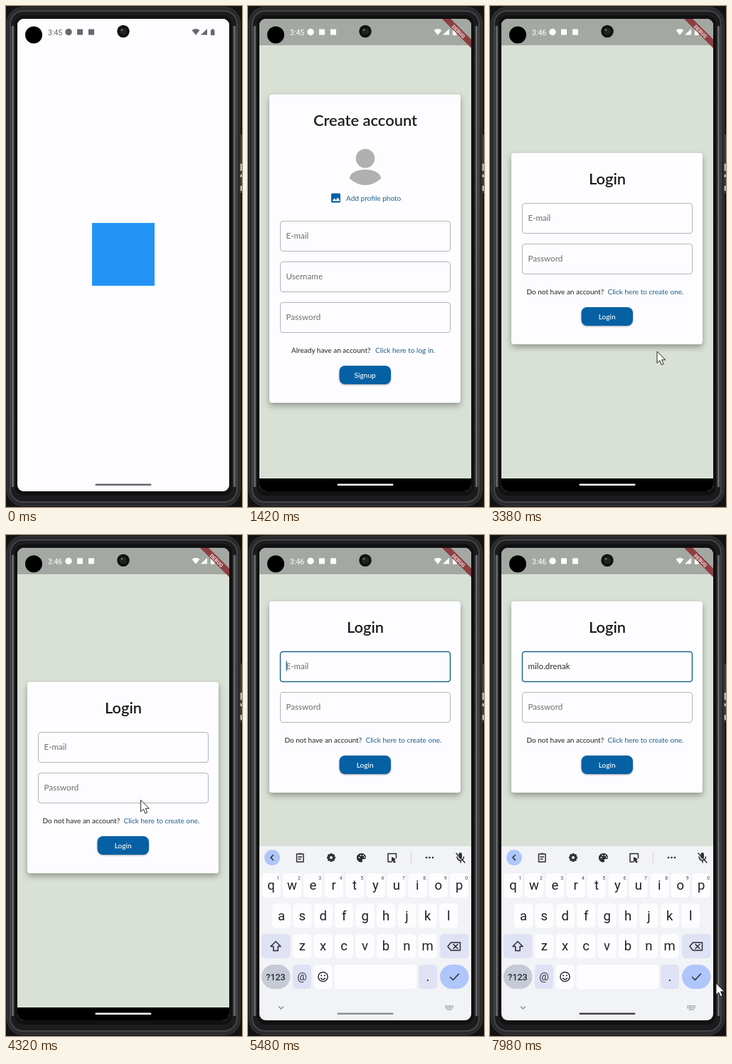
An HTML page that plays this animation: 332x702 px, repeating every 8 s.

```html
<!DOCTYPE html>
<html lang="en">
<head>
<meta charset="utf-8">
<style>
  html, body { margin: 0; width: 100%; height: 100%; overflow: hidden; background: #121213; }
  svg { display: block; width: 332px; height: 702px; font-family: Lato, sans-serif; }
  .card { fill: #fdfcff; filter: drop-shadow(0 4px 4px #0005); }
  .title { font-size: 21.9px; font-weight: 600; fill: #1b1c1e; }
  .box { fill: none; stroke: #b3b6b9; }
  .focus .box { stroke: #22688c; stroke-width: 1.5; }
  .label { font-size: 11.6px; fill: #6c6e70; }
  .typed { font-size: 11.6px; fill: #2c2d2f; }
  .small { font-size: 10px; fill: #1f2022; }
  .link { font-size: 10.05px; fill: #1f5f8c; }
  .button { fill: #0561a4; filter: drop-shadow(0 1px 1px #0005); }
  .caption { font-size: 10.1px; font-weight: 500; fill: #fff; }
  .key { font: 18.5px Roboto, sans-serif; fill: #1e1f22; }
  .digit { font: 7px Roboto, sans-serif; fill: #4b4c52; }
  .line { fill: none; stroke: #2c2d32; stroke-width: 1.5; stroke-linejoin: round; stroke-linecap: round; }
  .mid { text-anchor: middle; }
</style>
</head>
<body>
<svg viewBox="0 0 332 702">
  <defs>
    <clipPath id="screen"><rect x="16" y="18" width="298" height="662" rx="9"/></clipPath>
    <linearGradient id="metal">
      <stop offset="0" stop-color="#222224"/><stop offset=".5" stop-color="#747476"/><stop offset="1" stop-color="#222224"/>
    </linearGradient>
  </defs>

  <rect width="332" height="702" fill="#121213"/>
  <rect x="1.5" y="1.5" width="328" height="699" rx="22" fill="#2a2a2c" stroke="#38383a"/>
  <rect x="6" y="7" width="319" height="688" rx="18" fill="#1c1c1e" stroke="#444446" stroke-width="2"/>
  <rect x="7" y="28" width="5" height="646" fill="url(#metal)"/>
  <rect x="319" y="28" width="5" height="646" fill="url(#metal)"/>
  <rect x="12" y="13" width="306" height="673" rx="13" fill="#111112"/>
  <path d="M331 180v82" stroke="#3c3c3e" stroke-width="2"/>
  <path d="M331 221v10M331 236v4M331 252v7" stroke="#bdb5a8" stroke-width="3"/>

  <g clip-path="url(#screen)">
    <g id="app">
      <rect x="16" y="18" width="298" height="662" fill="#d9e1d6"/>
      <rect x="16" y="18" width="298" height="37" fill="#a3a9a2"/>
      <g id="signup"></g>
      <g id="login"></g>
      <rect x="16" y="662" width="298" height="18" fill="#000"/>
      <g id="keyboard"></g>
    </g>
    <g id="splash">
      <rect x="16" y="18" width="298" height="662" fill="#fdfcff"/>
      <rect x="121" y="304" width="88" height="88" fill="#2394f6"/>
    </g>
    <rect id="pill" x="125.500" y="669.500" width="79" height="2.500" rx="1.250"/>
    <g id="status">
      <text id="clock" x="59" y="40.500" font-size="10.500" style="font-family:Roboto,sans-serif"></text>
      <circle cx="88" cy="36.500" r="4.700"/>
      <rect x="100" y="32.500" width="8" height="8"/>
      <rect x="116" y="32.500" width="8" height="8"/>
      <path d="M261.500 34q5.500-4 11 0l-5.500 6.800zM283 32v8.500h-9zM288 33.500h1.500v-1.200h2.500v1.200h1.500v7.500h-5.500z"/>
    </g>
    <g id="banner">
      <path d="M273 18h12.200L314 46.800V59z" fill="#8c3436e8"/>
      <text class="mid" transform="translate(296.300 35.700) rotate(45)" y="2.600" font-size="7.200" font-weight="900" fill="#e6d2d2" style="font-family:Roboto,sans-serif">DEBUG</text>
    </g>
  </g>
  <circle cx="39" cy="40.500" r="12"/>
  <circle cx="165" cy="35.500" r="8.700" fill="#111112"/>
  <circle cx="165" cy="35.500" r="5" fill="#232325"/>
  <circle cx="163" cy="33.500" r="1.300" fill="#77777a"/>
  <path id="mouse" d="M0 0v16.300l3.800-3.500 2.500 5.900 2.800-1.200-2.500-5.700h5.200z" fill="#fff" stroke="#111" stroke-width=".9"/>
</svg>

<script>
const LOOP = 8000, ADDRESS = 'milo.drenak';
const TYPE_START = 6460, TYPE_STEP = 100, FOCUS_AT = 4980;
const INK = '#2c2d32', PANEL = '#f2f3f6', KEY = '#fdfdff', LAVENDER = '#dfe1f5', BLUE = '#afc6fa';
const $ = id => document.getElementById(id);

const text = (cls, x, y, s) => `<text class="${cls}" x="${x}" y="${y}">${s}</text>`;
const rect = (x, y, w, h, r, fill) => `<rect x="${x}" y="${y}" width="${w}" height="${h}" rx="${r}" fill="${fill}"/>`;
const line = d => `<path class="line" d="${d}"/>`;

const field = (y, label, id) => `<g id="${id}">
  <rect class="box" x="45.500" y="${y}" width="239" height="42" rx="3.500"/>${text('label', 53.5, y + 24.5, label)}</g>`;

// Coordinates inside a card are relative to its top edge.
const card = (height, title, body, question, askX, link, linkX, action) => `
  <rect class="card" x="30" y="0" width="269" height="${height}" rx="4"/>
  ${text('title mid', 165, 43.5, title)}${body}
  ${text('small', askX, height - 70, question)}${text('link', linkX, height - 70, link)}
  <rect class="button" x="128.500" y="${height - 52}" width="72.500" height="26" rx="8"/>
  ${text('caption mid', 164.7, height - 35.5, action)}`;

$('signup').innerHTML = card(432, 'Create account', `
  <g fill="#b0b0b0"><circle cx="165" cy="89.500" r="13.300"/>
    <path d="M143 118c0-17 44-17 44 0q-22 18-44 0z"/></g>
  ${rect(117, 138.5, 13, 13, 1.5, '#0561a4')}
  <path d="M118.500 149.300l3-4 2.200 2.600 2.600-3.600 3.200 5z" fill="#fff"/>
  ${text('link', 138, 148.5, 'Add profile photo')}
  ${field(177.5, 'E-mail', 'newEmail')}${field(234.5, 'Username', 'newName')}${field(291.5, 'Password', 'newPass')}`,
  'Already have an account?', 61, 'Click here to log in.', 179, 'Signup');

$('login').innerHTML = card(268, 'Login', `
  ${field(70.5, 'E-mail', 'email')}${field(127.5, 'Password', 'pass')}
  <text id="typed" class="typed" x="53.500" y="95"></text>
  <rect id="caret" y="83.500" width="1.300" height="14" fill="#22688c"/>`,
  'Do not have an account?', 51.5, 'Click here to create one.', 165.5, 'Login');

function keyRow(letters, firstX, y, digits = '') {
  return [...letters].map((c, i) => {
    const x = firstX + i * 29.4;
    return rect(x - 13, y - 17, 26, 34, 5, KEY) + text('key mid', x, y + 6, c) +
      (digits ? text('digit mid', x + 10, y - 8, digits[i]) : '');
  }).join('');
}

const dots = (points, r = 1.3, fill = INK) =>
  points.map(([x, y]) => `<circle cx="${x}" cy="${y}" r="${r}" fill="${fill}"/>`).join('');
const teeth = [...Array(8)].map((_, i) =>
  `<g transform="rotate(${i * 45} 117 452)">${rect(115.5, 446, 3, 3, 0, INK)}</g>`).join('');

$('keyboard').innerHTML = rect(16, 436, 298, 246, 0, PANEL) +
  `<circle cx="34" cy="452" r="11" fill="${BLUE}"/>` + line('M35.500 448.500l-3.500 3.500 3.500 3.500') +
  line('M68.500 447h9.500v11h-9.500zM71.500 446.500h3.500M71 451h4.500M71 454h3') +
  teeth + `<circle cx="117" cy="452" r="3.400" fill="none" stroke="${INK}" stroke-width="2.600"/>` +
  `<path d="M160 446a6.300 6.300 0 1 0 0 12.500q2-1 .5-3 0-1.500 2-1.500h2q2-.5 1.500-3-1.500-5-6-5z" fill="${INK}"/>` +
  dots([[156.5, 452], [158.5, 449], [162, 449], [164, 451.5]], 1, PANEL) +
  line('M202 458h-5v-11.500h11.500v6') + `<path d="M202 451l6 3-2 1.500 2 3-2.500 1-2-3-1.500 2z" fill="${INK}"/>` +
  '<path d="M229.500 444v16" stroke="#d0d2d8"/>' + dots([[251, 452], [255.5, 452], [260, 452]]) +
  rect(296.5, 445, 4.5, 8.5, 2.2, INK) + line('M294 451q1 5 5 5t4.500-5M299 456v3M293 446l12 13') +
  keyRow('qwertyuiop', 32.5, 491, '1234567890') + keyRow('asdfghjkl', 47, 533.5) + keyRow('zxcvbnm', 76.3, 576) +
  rect(19, 559, 40.5, 34, 5, LAVENDER) + line('M39 569.500l-7 7h3.800v6h6.400v-6h3.800z') +
  rect(270, 559, 40.5, 34, 5, LAVENDER) + line('M281 576.500l4.500-5.500h13v11h-13zM289 573.500l6 6M295 573.500l-6 6') +
  rect(19, 602, 40.5, 34, 17, '#c5cad6') + `<text class="mid" x="39" y="623.500" font-size="12.500" font-weight="500" fill="${INK}" style="font-family:Roboto,sans-serif">?123</text>` +
  rect(63, 602, 26, 34, 5, LAVENDER) + `<text class="mid" x="76" y="624" font-size="15" fill="${INK}" style="font-family:Roboto,sans-serif">@</text>` +
  rect(92.5, 602, 26, 34, 5, KEY) + '<circle class="line" cx="105.500" cy="619" r="6.600"/>' +
  dots([[103.2, 617.3], [107.8, 617.3]], 1.1) + line('M102.500 621q3 3.500 6 0') +
  rect(121.5, 602, 115.5, 34, 5, KEY) +
  rect(240, 602, 26, 34, 5, LAVENDER) + text('key mid', 253, 625, '.') +
  rect(270, 602, 40.5, 34, 17, BLUE) + line('M284.500 619.500l4 4 8-8.500') +
  '<g opacity=".5">' + line('M43.500 661l3 3 3-3') + '</g>' +
  '<path d="M277.500 660h11.500M277.500 662.500h11.500M280 665h7" stroke="#85868c" stroke-width="1.600" stroke-dasharray="1.600 .8"/>';

const clamp = v => Math.max(0, Math.min(1, v));
const smooth = p => p * p * (3 - 2 * p);
const ease = (t, start, duration) => smooth(clamp((t - start) / duration));
const show = (id, on) => $(id).style.display = on ? '' : 'none';

// time, x, y
const mousePath = [
  [1500, 340, 640], [2250, 235, 484], [3950, 235, 484], [4600, 160, 298],
  [4960, 160, 298], [5140, 345, 420], [7640, 345, 645], [7940, 318, 628], [8000, 318, 628]
];

function mouseAt(t) {
  const i = mousePath.findIndex(p => p[0] > t);
  if (i < 1) return [345, 640];
  const [t0, x0, y0] = mousePath[i - 1], [t1, x1, y1] = mousePath[i];
  const p = ease(t, t0, t1 - t0);
  return [x0 + (x1 - x0) * p, y0 + (y1 - y0) * p];
}

function draw(t) {
  const started = t >= 700, loggingIn = t >= 2700, focused = t >= FOCUS_AT;
  const rise = ease(t, 5125, 300);
  const keyboardTop = 680 - 244 * rise;
  const cardMiddle = (18 + Math.min(662, keyboardTop)) / 2;

  $('splash').style.opacity = 1 - clamp((t - 700) / 100);
  show('banner', started);
  show('signup', !loggingIn);
  show('login', loggingIn);
  $('signup').setAttribute('transform', 'translate(0 124)');
  $('login').setAttribute('transform', `translate(0 ${cardMiddle - 134})`);
  show('keyboard', rise > 0);
  $('keyboard').setAttribute('transform', `translate(0 ${keyboardTop - 436})`);

  $('status').setAttribute('fill', started ? '#fff' : '#68696c');
  $('pill').setAttribute('fill', !started ? '#68696c' : rise < .5 ? '#fff' : t < 5600 ? '#8e8f93' : '#46474a');
  $('clock').textContent = t < 2400 ? '3:45' : '3:46';

  const count = Math.max(0, Math.min(ADDRESS.length, Math.floor((t - TYPE_START) / TYPE_STEP) + 1));
  $('email').setAttribute('class', focused ? 'focus' : '');
  $('email').querySelector('text').style.display = count ? 'none' : '';
  const typed = $('typed');
  typed.textContent = ADDRESS.slice(0, count);
  const blinkStart = count ? TYPE_START + (count - 1) * TYPE_STEP : 5200;
  show('caret', t >= blinkStart && Math.floor((t - blinkStart) / 500) % 2 === 0);
  $('caret').setAttribute('x', 53.5 + (count ? typed.getComputedTextLength() : 0));

  $('mouse').setAttribute('transform', `translate(${mouseAt(t)})`);
}

function tick() {
  draw(performance.now() % LOOP);
  requestAnimationFrame(tick);
}
tick();
</script>
</body>
</html>
```
